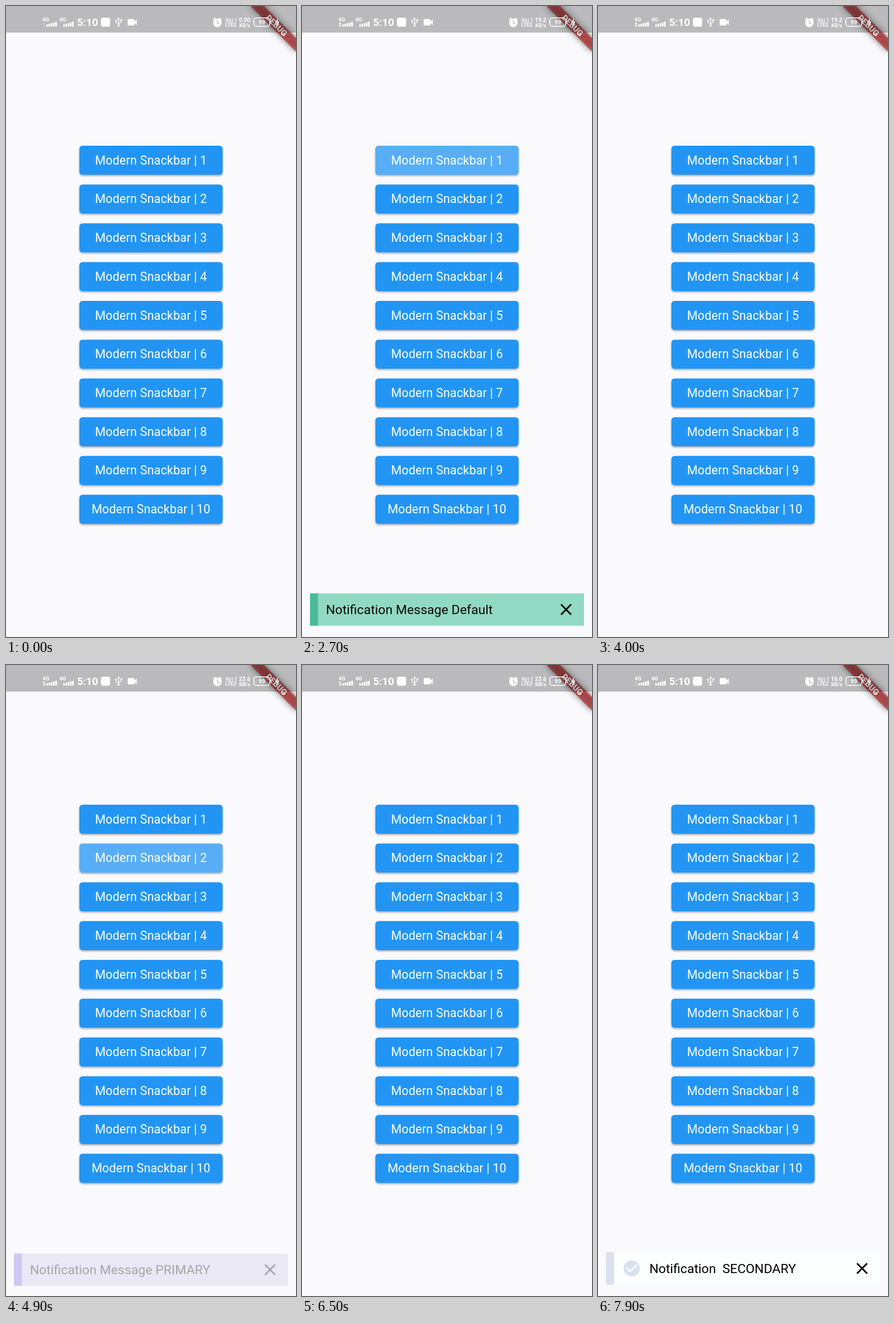
Animation, 508 px wide and 1102 px high, one loop 8 s. Source, as an HTML page:

```html
<!DOCTYPE html>
<html lang="en">
<head>
<meta charset="utf-8">
<title>Snackbar demo</title>
<style>
html, body { margin: 0; width: 100%; height: 100%; overflow: hidden; background: #faf9fc; }
svg { display: block; width: 508px; height: 1102px; font-family: Roboto, "Noto Sans", sans-serif; }
.label { font-size: 21.17px; letter-spacing: .14px; fill: #fff; text-anchor: middle; }
.message { font-size: 22.58px; fill: #000; white-space: pre; }
.status { fill: #fff; font-weight: 700; }
</style>
</head>
<body>
<svg viewBox="0 0 508 1102" xmlns="http://www.w3.org/2000/svg">
  <defs>
    <filter id="soft" x="-30%" y="-150%" width="160%" height="400%"><feGaussianBlur stdDeviation="5.6"/></filter>
    <filter id="lift" x="-5%" y="-20%" width="110%" height="150%">
      <feDropShadow dx="0" dy="2" stdDeviation="1.5" flood-color="#000" flood-opacity=".32"/>
    </filter>
    <clipPath id="buttonClip"><rect id="clipRect" x="128.5" width="251" height="50.8" rx="5.6"/></clipPath>
    <g id="signal"></g>
  </defs>
  <rect width="508" height="1102" fill="#faf9fc"/>
  <g id="buttons" filter="url(#lift)"></g>
  <g id="ink" clip-path="url(#buttonClip)" fill="#fff">
    <rect id="tint" x="128" width="252" height="51" opacity=".12"/>
    <circle id="ripple" opacity=".135"/>
  </g>
  <g id="labels"></g>
  <g id="bars"></g>
  <g transform="translate(508) rotate(45)">
    <rect x="-56.4" y="39.5" width="112.8" height="16.9" opacity=".5" filter="url(#soft)"/>
    <rect x="-56.4" y="39.5" width="112.8" height="16.9" fill="#b71c1c" fill-opacity=".627"/>
    <text y="53" font-size="14.4" font-weight="900" fill="#fff" text-anchor="middle">DEBUG</text>
  </g>
  <rect width="508" height="46.5" opacity=".26"/>
  <g class="status">
    <use href="#signal"/>
    <use href="#signal" x="29.5"/>
    <path id="arrows" d="M64 31.8l2.7-3.2 2.7 3.2zM64 33.4h5.4l-2.7 3.2z"/>
    <text x="124.5" y="34.7" font-size="18.4">5:10</text>
    <rect x="166.3" y="20.3" width="16" height="16" rx="3.5"/>
    <g fill="none" stroke="#fff" stroke-width="1.3">
      <path d="M197.3 22v12M192.7 26v2.6q0 1.4 4.6 3M202 25.5v2q0 1.4-4.7 2.6"/>
    </g>
    <path d="M195 23.4l2.3-3.4 2.3 3.4zM200.5 23.2h3v3h-3z"/>
    <circle cx="192.7" cy="25.5" r="1.6"/>
    <circle cx="197.3" cy="34.2" r="1.9"/>
    <path d="M214.3 22.8h9.2q1.2 0 1.2 1.2v2.8l4.4-3.4v10l-4.4-3.4v2.8q0 1.2-1.2 1.2h-9.2q-1.2 0-1.2-1.2v-8.800q0-1.200 1.200-1.200z"/>
    <circle cx="370.3" cy="29.4" r="7.4"/>
    <path d="M363 24.600l4.300-3.600M377.600 24.600l-4.300-3.600" stroke="#fff" stroke-width="2"/>
    <path d="M370.300 25v4.800l3.300 2" fill="none" stroke="#b9b7ba" stroke-width="1.500"/>
    <g font-size="9">
      <text x="384.500" y="27.700" font-size="8.500">Vo)</text>
      <text x="400" y="27.700" font-size="8.500">1</text>
      <text x="384" y="36.200">LTE2</text>
      <text x="418.200" y="36.500" text-anchor="middle">KB/s</text>
      <text id="rate" x="418" y="27.500" font-size="10" text-anchor="middle"></text>
    </g>
    <rect x="434.200" y="20.700" width="28" height="14.800" rx="4.500" fill="none" stroke="#fff" stroke-width="1.500"/>
    <text x="448.200" y="31.800" font-size="10" text-anchor="middle">99</text>
    <path d="M463.500 25.500q2.500 2.500 0 5z"/>
    <path d="M476.500 21l-5 8.300h3.500l-1.500 6.700 5.500-8.700h-3.500z"/>
  </g>
  <g id="touch" fill="#fff">
    <circle r="14.500" opacity=".2"/>
    <circle r="13" opacity=".65"/>
  </g>
</svg>
<script>
const LOOP = 8000, STEP = 100, DP = 508 / 360;
const FIRST = 244, PITCH = 48 * DP, BUTTON_H = 36 * DP;
const BAR_Y = 1025.6, BAR_H = 40 * DP, SLIDE = 90, SLIDE_MS = 250;
const CLOSE = 'M19 6.41L17.59 5 12 10.59 6.41 5 5 6.41 10.59 12 5 17.59 6.41 19 12 13.41 17.59 19 19 17.59 13.41 12z';
const CHECK = 'M12 2C6.48 2 2 6.48 2 12s4.48 10 10 10 10-4.48 10-10S17.52 2 12 2zm-2 15l-5-5 1.41-1.41L10 14.17l7.59-7.59L19 8l-9 9z';

const snacks = [
  { tap: 2400, show: 2465, hide: 3750, x: 176, text: 'Notification Message Default', edge: '#46ba97', fill: '#90d9c2' },
  { tap: 4600, show: 4700, hide: 6060, x: 176, text: 'Notification Message PRIMARY', edge: '#7a66e6', fill: '#cbc7e4' },
  { tap: 6900, show: 6960, hide: Infinity, x: 176, text: 'Notification  SECONDARY', edge: '#d8e1ed', fill: '#fdfefe', icon: true }
];
const rates = [[0, '0.00'], [1700, '19.2'], [4700, '23.6'], [7800, '16.0']];

const el = id => document.getElementById(id);
const clamp = v => Math.max(0, Math.min(1, v));
const set = (node, attrs) => { for (const k in attrs) node.setAttribute(k, attrs[k]); };
const show = (node, on) => set(node, { visibility: on ? 'visible' : 'hidden' });
const buttonY = i => FIRST + i * PITCH;

// Cubic curve (.4, 0, .2, 1), solved by bisection
function ease(x) {
  if (x <= 0 || x >= 1) return clamp(x);
  let lo = 0, hi = 1, s = .5;
  for (let i = 0; i < 24; i++) {
    s = (lo + hi) / 2;
    const at = 1.2 * s * (1 - s) ** 2 + .6 * s * s * (1 - s) + s ** 3;
    if (at < x) lo = s; else hi = s;
  }
  return 3 * s * s * (1 - s) + s ** 3;
}

function icon(path, cx, color) {
  const x = cx - 12 * DP, y = BAR_Y + BAR_H / 2 - 12 * DP;
  return `<path d="${path}" fill="${color}" transform="translate(${x} ${y}) scale(${DP})"/>`;
}

function build() {
  let buttons = '', labels = '', signal = '<text x="63.8" y="27.3" font-size="9.6">4G</text>';
  for (let i = 0; i < 10; i++) {
    const y = buttonY(i);
    buttons += `<rect x="128.5" y="${y}" width="251" height="${BUTTON_H}" rx="5.6" fill="#2195f4"/>`;
    labels += `<text class="label" x="254" y="${y + BUTTON_H / 2 + 7.2}">Modern Snackbar | ${i + 1}</text>`;
  }
  for (let i = 0; i < 5; i++) {
    const h = 4 + i * 1.1;
    signal += `<rect x="${70.6 + i * 3.9}" y="${36 - h}" width="2.9" height="${h}" rx=".8"/>`;
  }
  el('buttons').innerHTML = buttons;
  el('labels').innerHTML = labels;
  el('signal').innerHTML = signal;
  el('bars').innerHTML = snacks.map(s => `<g>
    <rect x="14" y="${BAR_Y}" width="480" height="${BAR_H}" fill="${s.fill}"/>
    <rect x="14" y="${BAR_Y}" width="14.1" height="${BAR_H}" fill="${s.edge}"/>
    ${s.icon ? icon(CHECK, 59.2, s.edge) : ''}
    <text class="message" x="${s.icon ? 90 : 42}" y="${BAR_Y + BAR_H / 2 + 7.8}">${s.text}</text>
    ${icon(CLOSE, 462.6, '#000')}</g>`).join('');
  snacks.forEach((s, i) => { s.node = el('bars').children[i]; });
}

function drawSnack(s, t) {
  const enter = clamp((t - s.show) / SLIDE_MS);
  const leave = clamp((t - s.hide) / SLIDE_MS);
  const lift = leave > 0 ? ease(1 - leave) : ease(enter);
  set(s.node, {
    transform: `translate(0 ${(1 - lift) * SLIDE})`,
    opacity: leave === 1 ? 0 : ease((enter - .72) / .28)
  });
}

function drawInk(t) {
  const i = snacks.findIndex(s => t >= s.tap && t < s.tap + 500);
  const age = i < 0 ? 0 : t - snacks[i].tap;
  show(el('touch'), i >= 0 && age < 100);
  show(el('ink'), age > 0);
  if (i < 0) return;
  const y = buttonY(i), cy = y + BUTTON_H / 2, x = snacks[i].x;
  set(el('touch'), { transform: `translate(${x} ${cy})` });
  set(el('clipRect'), { y });
  set(el('tint'), { y });
  set(el('ripple'), { cx: x, cy, r: 210 * ease(age / 225) });
  set(el('ink'), { opacity: clamp((500 - age) / 200) });
}

function render(t) {
  snacks.forEach(s => drawSnack(s, t));
  drawInk(t);
  el('rate').textContent = rates.filter(r => r[0] <= t).pop()[1];
  set(el('arrows'), { opacity: t >= 800 && t < 7800 ? 1 : .3 });
}

build();
const start = performance.now();
function tick() {
  const t = (performance.now() - start) % LOOP;
  render(Math.floor(t / STEP) * STEP);
  requestAnimationFrame(tick);
}
tick();
</script>
</body>
</html>
```
